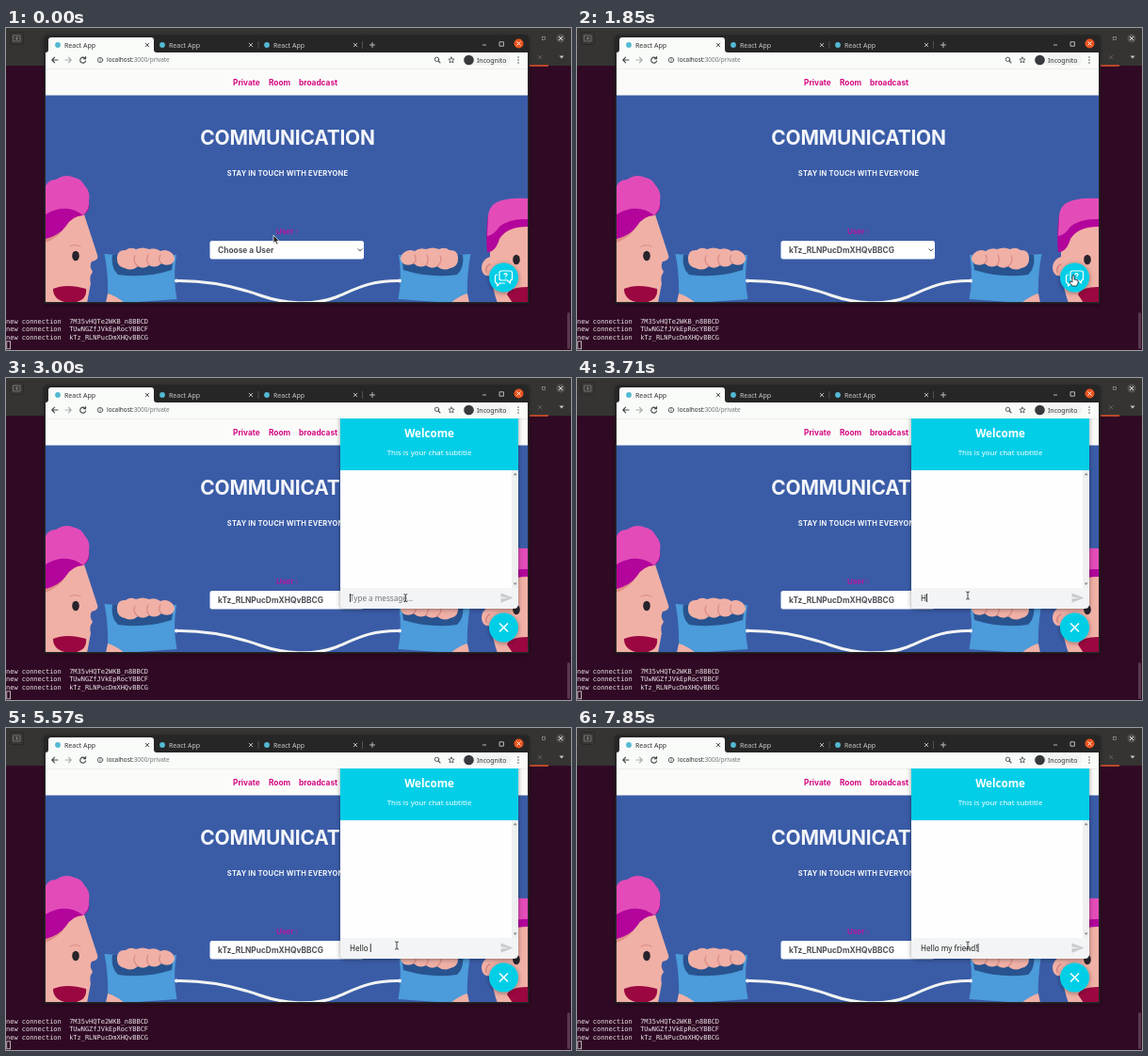
Write an HTML page that moves like this. It is 600 by 342 pixels and loops after 8 s.

```html
<!DOCTYPE html>
<html lang="en">
<head>
<meta charset="utf-8">
<title>Private chat</title>
<style>
  html, body { margin: 0; width: 100%; height: 100%; overflow: hidden; background: #300a24; }
  svg { display: block; width: 600px; height: 342px; font-family: "Noto Sans", sans-serif; }
  text { white-space: pre; }
  .poppy { font-family: Inter, sans-serif; font-weight: 700; }
  .mid { text-anchor: middle; }
  .term { font: 6.97px "DejaVu Sans Mono", monospace; fill: #e8e4e6; }
  .line { fill: none; stroke-linecap: round; stroke-linejoin: round; }
</style>
</head>
<body>
<svg viewBox="0 0 600 342">
  <defs>
    <clipPath id="page"><rect x="42" y="43" width="512" height="248"/></clipPath>
    <filter id="shadow" x="-20%" y="-20%" width="140%" height="140%">
      <feDropShadow dx="0" dy="1" stdDeviation="2.5" flood-opacity=".4"/>
    </filter>
    <path id="cross" class="line" d="M-1.8-1.8 1.8 1.8M1.8-1.8-1.8 1.8"/>
    <g id="tab">
      <circle cx="55" cy="18" r="2.9" fill="#53b9d3"/>
      <text x="62" y="20.5" font-size="7">React App</text>
    </g>
    <g id="cup">
      <path d="M104.500 240Q142 244 181 241 177 266 181.500 288L126 292 108 287Q109 262 104.500 240Z" fill="#4c9bda"/>
      <path d="M113 241Q111 255 119 262 148 266 176 257L178 241Z" fill="#28538f"/>
      <path d="M108 282Q116 284 126 292H106Z" fill="#f0b0a6"/>
      <path d="M118 243Q119 235 127 236 132 232 138 235 145 232 152 235 159 233 164 237 171 234 177 240 182 246 175 251 169 253 165 250 159 256 152 252 146 257 140 253 134 259 126 255 117 253 118 243Z" fill="#f0b0a6"/>
      <path class="line" d="M137 242Q134 248 140 253M151 241Q148 247 152 252M164 241Q161 246 165 250" stroke="#d98983" stroke-width="1.2"/>
    </g>
  </defs>

  <!-- terminal behind the browser -->
  <rect width="600" height="342" fill="#300a24"/>
  <rect width="600" height="40" fill="#353432"/>
  <rect x="4.5" y="4.5" width="14" height="13" rx="2" fill="#393735" stroke="#2a2826"/>
  <path class="line" d="M8 8h7v6H8zM11.5 9.5v3M10 11h3" stroke="#85827e" stroke-width=".8"/>
  <rect x="569.5" y="9.5" width="3" height="3" fill="none" stroke="#999" stroke-width=".7"/>
  <circle cx="589" cy="11" r="4.5" fill="#54514e"/>
  <use href="#cross" x="589" y="11" stroke="#ddd"/>
  <use href="#cross" x="567" y="31" stroke="#666" stroke-width=".8"/>
  <path d="M556 39h20v2h-20z" fill="#b9492a"/>
  <path d="M587.5 29.5h5l-2.5 3z" fill="#c7c3be"/>
  <rect x="596" y="302" width="3" height="39" rx="1.5" fill="#58394e"/>
  <g class="term">
    <text y="314">new connection  7M35vHQTe2WKB_n8BBCD</text>
    <text y="322.4">new connection  TUwNGZfJVkEpRocYBBCF</text>
    <text y="330.8">new connection  kTz_RLNPucDmXHQvBBCG</text>
  </g>
  <rect x=".8" y="332.8" width="3.8" height="8" fill="none" stroke="#ddd" stroke-width=".8"/>

  <!-- browser chrome -->
  <path filter="url(#shadow)" d="M40.500 292.500V11.500q0-4 4-4h507q4 0 4 4v281z" fill="#252525"/>
  <path d="M42 26q3 0 3-3V13q0-3 3-3h106q3 0 3 3v10q0 3 3 3h394v17H42z" fill="#f9fbf9"/>
  <use href="#tab" fill="#333"/>
  <use href="#tab" x="111" fill="#c9c9c9"/>
  <use href="#tab" x="222" fill="#c9c9c9"/>
  <use href="#cross" x="150" y="18" stroke="#444" stroke-width=".9"/>
  <g stroke="#c9c9c9" stroke-width=".9">
    <use href="#cross" x="260" y="18"/>
    <use href="#cross" x="371" y="18"/>
    <path d="M386 18h6M389 15v6M506 18h4M524 14.8h4.4v4.4H524z" fill="none"/>
    <path d="M268 14v8M378.500 14v8" stroke="#555"/>
  </g>
  <circle cx="544.500" cy="16.500" r="5" fill="#e9541f"/>
  <use href="#cross" x="544.500" y="16.500" stroke="#fff" stroke-width=".9"/>
  <g class="line" stroke="#454749" stroke-width="1.100">
    <path d="M55 34h-6m2.600-2.800L48.800 34l2.800 2.800"/>
    <path d="M63 34h6m-2.600-2.800L69.200 34l-2.800 2.800" stroke="#a9abad"/>
    <path d="M84 32.200a3 3 0 1 0 .6 2.800M84.600 30.600v2.200h-2.200"/>
    <circle cx="100" cy="34" r="2.700" stroke-width=".8"/>
    <path d="M100 33.800v1.400M100 32.500v.1" stroke-width=".8"/>
    <circle cx="457.500" cy="33.300" r="2.200" stroke-width=".9"/>
    <path d="M459.200 35 461 36.800"/>
    <path d="M473 31l.9 2 2.200.2-1.700 1.500.6 2.200-2-1.200-2 1.200.6-2.200-1.700-1.500 2.200-.2z" stroke-width=".8"/>
    <path d="M544 31v.1M544 34v.1M544 37v.1" stroke-width="1.500"/>
  </g>
  <rect x="485" y="28.500" width="51" height="11" rx="5.500" fill="#f1f3f2"/>
  <circle cx="491.500" cy="34" r="5.300" fill="#37393c"/>
  <text x="500" y="36.600" font-size="7" fill="#333">Incognito</text>
  <text x="107" y="36.400" font-size="6.400" fill="#2b2d2f">localhost:<tspan fill="#737678">3000/private</tspan></text>

  <!-- web page -->
  <g clip-path="url(#page)">
    <path d="M42 43h512v30H42z" fill="#fbfcfa"/>
    <path d="M42 43h512" stroke="#dfe1df"/>
    <path d="M42 71.500h512V291H42z" fill="#3a5ca7"/>
    <g class="poppy" font-size="8.300" fill="#d40880">
      <text x="241" y="60.500">Private</text>
      <text x="279" y="60.500">Room</text>
      <text x="311" y="60.500">broadcast</text>
    </g>
    <text class="poppy mid" x="299" y="124" font-size="20.900" letter-spacing="-.2" fill="#f4f6fa">COMMUNICATION</text>
    <text class="poppy mid" x="299" y="157" font-size="7.500" letter-spacing=".2" fill="#f4f6fa">STAY IN TOUCH WITH EVERYONE</text>
    <text class="poppy mid" x="298.500" y="219" font-size="8" fill="#b516a0">User :</text>

    <!-- left caller -->
    <path d="M42 195H82L97 241Q99 246 91 248 88 253 92 259 88 264 90 271L86 292H42Z" fill="#f0b0a6"/>
    <path d="M42 222 62 212Q57 222 42 228Z" fill="#dd8f88"/>
    <path d="M42 184H88Q90 194 82 199 70 200 64 210 57 220 42 224Z" fill="#b3059b"/>
    <path d="M42 168Q45 161 53 161 63 154 73 159 80 160 84 168 90 174 88 184 89 192 82 199 71 190 57 192 48 194 42 198Z" fill="#e34cb8"/>
    <ellipse cx="74" cy="242" rx="3.800" ry="5.200" fill="#26232b"/>
    <path class="line" d="M68 232Q73 229 79 232" stroke="#d98983"/>
    <path d="M50 277Q64 271 85 277 87 290 70 292 50 291 50 277Z" fill="#9b0740"/>

    <!-- right caller -->
    <path d="M554 200H514V243Q505 246 505 255 506 265 515 263 518 282 522 292H554Z" fill="#f0b0a6"/>
    <path class="line" d="M514 251Q509 253 510 259" stroke="#d98983" stroke-width="1.800"/>
    <path d="M554 198H512Q509 220 511 238 520 238 524 224 532 211 554 211Z" fill="#b3059b"/>
    <path d="M554 181Q538 180 527 183 513 186 512 200L511 221Q518 220 524 211 535 202 554 203Z" fill="#e34cb8"/>
    <ellipse cx="542" cy="246" rx="3.800" ry="5.200" fill="#26232b"/>
    <path d="M554 275Q535 275 532 283L538 292H554Z" fill="#9b0740"/>

    <path class="line" d="M181 268.500C215 268 245 275 270 284 296 293 326 295 350 286 372 277 386 268 418 268.500" stroke="#f3f4f2" stroke-width="3"/>
    <use href="#cup"/>
    <use href="#cup" transform="matrix(-1 0 0 1 598 0)"/>
    <circle cx="181" cy="268.500" r="2" fill="#eef1f3"/>
    <circle cx="418" cy="268.500" r="2" fill="#eef1f3"/>

    <rect x="216.500" y="226" width="163.500" height="19.500" rx="2.500" fill="#fff"/>
    <text id="choice" class="poppy" x="225" y="239" font-size="8.400" fill="#4b4f55"></text>
    <path class="line" d="M374 234.800l2 2 2-2" stroke="#333"/>
    <g id="menu">
      <path filter="url(#shadow)" d="M216.500 246H380V259.500H216.500z" fill="#ef3e05"/>
      <text class="poppy" x="225" y="255.300" font-size="8.400" fill="#fff">kTz_RLNPucDmXHQvBBCG</text>
    </g>

    <!-- chat widget -->
    <g id="chat">
      <path filter="url(#shadow)" d="M355 30h189v210q0 5-5 5H360q-5 0-5-5z" fill="#f2f4f5"/>
      <path d="M355 43h189v55H355z" fill="#02cee7"/>
      <path d="M355 98h189v125H355z" fill="#fefefe"/>
      <path d="M537 98h7v125h-7z" fill="#eff0f0"/>
      <path d="M538.700 103.200h4l-2-2.500zM538.700 217.500h4l-2 2.500z" fill="#85898c"/>
      <g class="mid" fill="#fff">
        <text x="449.500" y="63" font-size="11.600" font-weight="600">Welcome</text>
        <text x="449.500" y="82" font-size="7.900">This is your chat subtitle</text>
      </g>
      <text id="message" x="365" y="236.500" font-size="8.100"></text>
      <path id="caret" d="M0 229v9" stroke="#222" stroke-width=".9"/>
      <path d="M525.500 228.500 538.500 233.500 525.500 238.800V234.600L534 233.500 525.500 232.500Z" fill="#c8ccce"/>
    </g>
    <circle cx="528.500" cy="265" r="15.500" fill="#02cee7" filter="url(#shadow)"/>
    <g id="bubbles" class="line" stroke="#fff" stroke-width="1.200">
      <path d="M526 258h9.500q2 0 2 2v6q0 2-2 2v3l-3-3H526q-2 0-2-2v-6q0-2 2-2z"/>
      <path d="M521.500 262q-2 0-2 2v5q0 2 2 2v3l3-3h5"/>
      <path d="M529 261.500q1.500-1.500 3 0 .5 1.200-1.300 2.300M530.700 266v.1"/>
    </g>
    <path id="close" class="line" d="M524.500 261l8 8M532.500 261l-8 8" stroke="#fff" stroke-width="1.700"/>
  </g>

  <g id="cursor">
    <path id="arrow" d="M0 0V8.500L2 6.700 3.500 10 5 9.300 3.500 6.300H6.200Z" fill="#222" stroke="#fff" stroke-width=".7"/>
    <path id="hand" d="M-1 0Q0-1 1 0V4L5 5 5 8 3.500 11H-1L-4 7-3 6-1 7Z" fill="#fff" stroke="#222" stroke-width=".8"/>
    <path id="beam" class="line" d="M-1.500-4Q0-4 0-3 0-4 1.500-4M0-3V3M-1.500 4Q0 4 0 3 0 4 1.500 4" stroke="#333" stroke-width=".9"/>
  </g>
</svg>
<script>
const LOOP = 8000, STEP = LOOP / 56;
const OPEN_MENU = 560, PICK = 1280, OPEN_CHAT = 1980;
const USER = 'kTz_RLNPucDmXHQvBBCG', MESSAGE = 'Hello my friend!';
// [time, x, y] of the pointer and [time, letters] of the typing
const PATH = [[0, 284, 220], [150, 284, 220], [500, 291, 237], [700, 291, 238], [1050, 293, 253],
  [1350, 293, 253], [1850, 527, 263], [2450, 527, 263], [3050, 415, 231], [LOOP, 415, 231]];
const TYPING = [[0, 0], [3560, 0], [3600, 1], [4150, 1], [5450, 6], [6800, 12], [7750, 16], [LOOP, 16]];

const el = id => document.getElementById(id);
const show = (id, on) => el(id).style.display = on ? '' : 'none';

function at(keys, t, i) {
  const n = Math.max(1, keys.findIndex(k => k[0] > t));
  const a = keys[n - 1], b = keys[n];
  return a[i] + (b[i] - a[i]) * (t - a[0]) / (b[0] - a[0]);
}

function draw(now) {
  const t = Math.floor(((now + 10) % LOOP) / STEP) * STEP;
  const x = at(PATH, t, 1), y = at(PATH, t, 2);
  const typed = MESSAGE.slice(0, Math.floor(at(TYPING, t, 1) + .01));
  const chatOpen = t >= OPEN_CHAT;
  const overButton = Math.hypot(x - 528.5, y - 265) < 15.5;
  const overInput = chatOpen && !overButton && y > 223 && y < 245 && x < 520;

  el('cursor').setAttribute('transform', `translate(${x} ${y})`);
  show('hand', overButton);
  show('beam', overInput);
  show('arrow', !overButton && !overInput);

  show('menu', t >= OPEN_MENU && t < PICK);
  el('choice').textContent = t < PICK ? 'Choose a User' : USER;

  show('chat', chatOpen);
  show('close', chatOpen);
  show('bubbles', !chatOpen);
  const message = el('message');
  message.textContent = typed || 'Type a message...';
  message.setAttribute('fill', typed ? '#222' : '#70757a');
  const caretX = 365.5 + (typed && chatOpen ? message.getComputedTextLength() : 0);
  el('caret').setAttribute('transform', `translate(${caretX} 0)`);
  show('caret', typed || (t - OPEN_CHAT) % 1000 < 500);
}

function tick() {
  draw(performance.now());
  requestAnimationFrame(tick);
}
tick();
</script>
</body>
</html>
```
